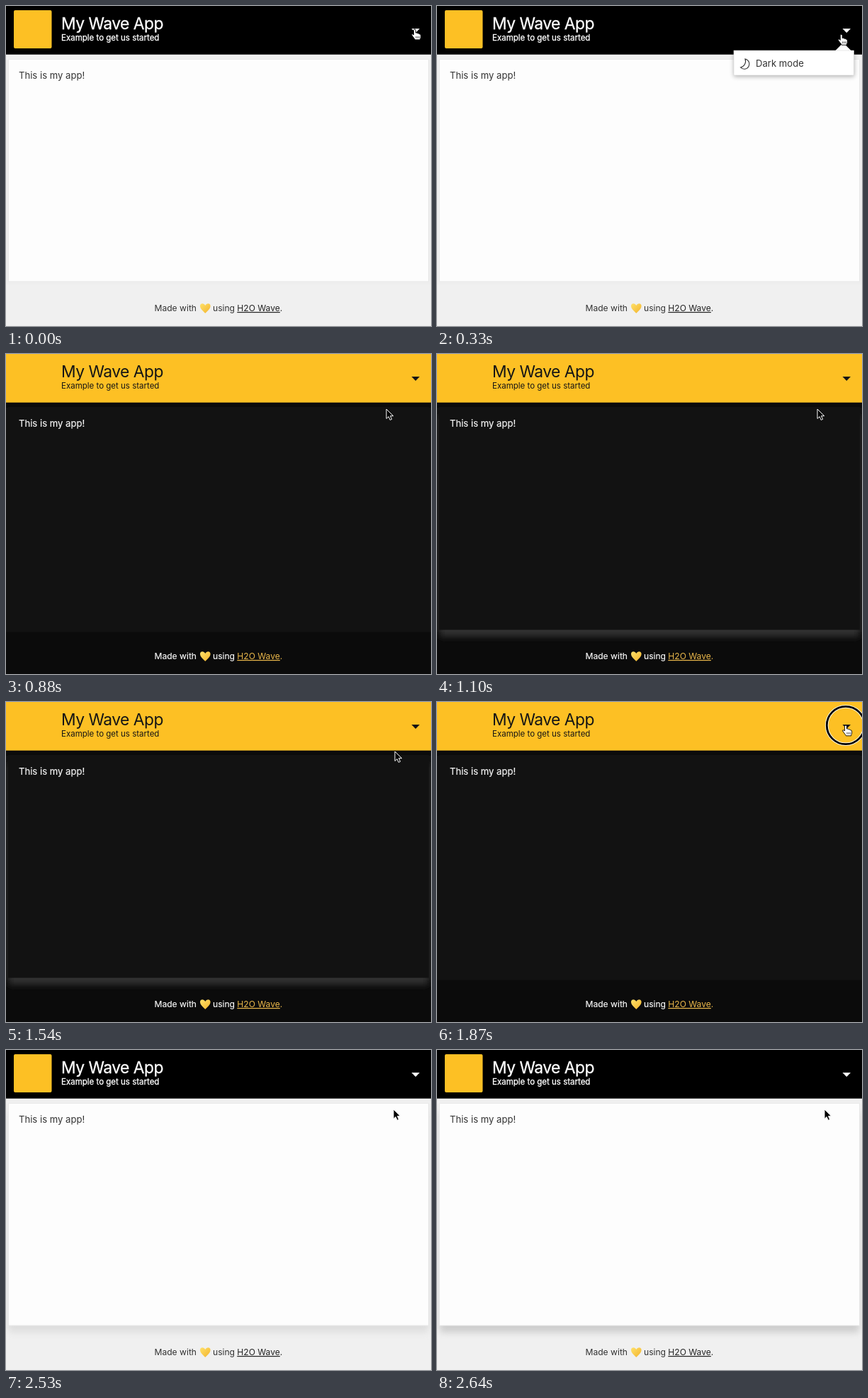
Recreate the animation shown at these times as an HTML page. Size 600x453 px, loop 2.75 s.

```html
<!DOCTYPE html>
<html lang="en">
<head>
<meta charset="utf-8">
<title>Theme switch</title>
<style>
html, body { margin: 0; width: 100%; height: 100%; overflow: hidden; }
svg {
  display: block; width: 100vw; height: 100vh;
  font-family: Inter, "Liberation Sans", sans-serif;
  --page: #f0f0f0; --rest: #eee; --card: #fdfdfd; --edge: #e9e9e9; --shade: #cecece;
  --bar: #000; --title: #fff; --text: #333; --link: #222;
  --menu: #fff; --hover: #ececec; --rim: #d6d6d6;
}
svg.dark {
  --page: #0b0b0b; --rest: #121212; --card: #121212; --edge: #121212; --shade: #323232;
  --bar: #fdc024; --title: #151515; --text: #f4f4f4; --link: #ecb94b;
  --menu: #141414; --hover: #2e2e2e; --rim: #242424;
}
.bar { fill: var(--bar); }
.title { fill: var(--title); }
.text { fill: var(--text); }
.link { fill: var(--link); }
svg:not(.dark) .head { stroke: #fff; stroke-width: .3px; }
.dark .text { stroke: var(--text); stroke-width: .2px; }
.night, .dark .day { display: none; }
.dark .night { display: inline; }
.icon { fill: none; stroke: var(--text); stroke-width: 1.1; }
.sun { stroke: #fdc024; }
</style>
</head>
<body>
<svg id="app" viewBox="0 0 600 453" preserveAspectRatio="none">
  <defs>
    <filter id="blur" x="-10%" y="-10%" width="120%" height="120%"><feGaussianBlur stdDeviation="5"/></filter>
    <filter id="soft" x="-10%" y="-40%" width="120%" height="180%"><feGaussianBlur stdDeviation="3"/></filter>
    <linearGradient id="gold" x2="1" y2="1"><stop stop-color="#ffe16a"/><stop offset="1" stop-color="#f2b32c"/></linearGradient>
  </defs>

  <rect width="600" height="453" fill="var(--page)"/>
  <rect y="76" width="600" height="317.5" fill="var(--rest)"/>
  <rect id="shade" x="4" y="88" width="592" height="312" fill="var(--shade)" filter="url(#blur)"/>
  <rect x="3.5" y="75.5" width="593" height="314.5" fill="var(--card)" stroke="var(--edge)"/>
  <text class="text" x="18" y="103" font-size="13.1">This is my app!</text>

  <rect class="bar" width="600" height="68.7"/>
  <rect x="11" y="6" width="53.5" height="54" rx="2" fill="#fdc024"/>
  <g class="title head">
    <text x="78" y="33" font-size="22.8" letter-spacing="-.5">My Wave App</text>
    <text x="78" y="49" font-size="11.5">Example to get us started</text>
  </g>
  <path class="title" d="M572.5 32h11.5l-5.75 6z"/>

  <g font-size="12.1">
    <text class="text" x="209.5" y="432">Made with</text>
    <path d="M281.3 435C278 431.5 274 429 274 424.6C274 420.6 279.3 420 281.3 424C283.3 420 288.6 420.6 288.6 424.6C288.6 429 284.6 431.5 281.3 435Z" fill="url(#gold)"/>
    <text class="text" x="292" y="432">using</text>
    <text class="link" x="326.3" y="432"><tspan text-decoration="underline">H2O Wave</tspan>.</text>
  </g>

  <g id="menu">
    <rect x="419" y="66" width="170" height="34" opacity=".3" filter="url(#soft)"/>
    <path d="M562 63.5l11.5-11.5 11.5 11.5z" fill="var(--menu)"/>
    <rect id="item" x="419" y="63" width="169.5" height="35" stroke="var(--rim)" stroke-width=".6"/>
    <g class="day">
      <path class="icon" d="M435 75A7.2 7.2 0 1 1 428.5 87A9 9 0 0 0 435 75Z"/>
      <text class="text" x="450" y="86" font-size="13.1">Dark mode</text>
    </g>
    <g class="night">
      <g class="icon sun" transform="translate(434.5 82)">
        <circle r="3.4"/>
        <path d="M0-5v-2.5M0 5v2.5M-5 0h-2.5M5 0h2.5M3.6-3.6l1.7-1.7M-3.6-3.6l-1.7-1.7M3.6 3.6l1.7 1.7M-3.6 3.6l-1.7 1.7"/>
      </g>
      <text class="text" x="450" y="86" font-size="13.1">Light mode</text>
    </g>
  </g>

  <g id="cursor">
    <g id="ring" fill="none">
      <circle r="26.7" stroke="#fff" stroke-width="4.8" opacity=".85"/>
      <circle r="26.7" stroke="#000" stroke-width="2.8"/>
    </g>
    <g id="hand" fill="#fff" stroke="#000" stroke-linejoin="round" transform="scale(.9)">
      <path d="M-1.6 1.5a1.6 1.6 0 0 1 3.2 0V5.5q2.6-.6 3 1q2.4-.4 2.8 1q2.2 0 2.2 2V12q0 1.6-1 3v1.5H.5l-.6-1.2q-2.6-3.4-4.6-6.3q-.6-1.6 1-1.6q1 0 2.1 1.5Z"/>
      <path d="M2.2 11v3M4.6 11v3M7 11v3" stroke-width=".8"/>
    </g>
    <path id="arrow" d="M0 0V13.5L3.1 10.6 5.2 15.4 7.6 14.4 5.5 9.7H9.8Z" stroke="#fff"/>
  </g>
</svg>
<script>
const LOOP = 2750, STEP = 110;
const el = id => document.getElementById(id);
const [app, shade, menu, item, cursor, ring, hand, arrow] =
  ["app", "shade", "menu", "item", "cursor", "ring", "hand", "arrow"].map(el);

// Pointer tip: time, x, y
const path = [
  [0, 577, 33], [220, 577, 33], [660, 537, 80], [770, 537, 80], [880, 537, 78],
  [1210, 537, 78], [1540, 549, 70], [1760, 577, 33], [1980, 577, 33],
  [2420, 548, 86], [2530, 547, 84], [LOOP, 547, 84]
];
// Click time: ring scale
const clicks = { 110: .92, 1870: 1, 2420: 1 };

const clamp = v => Math.max(0, Math.min(1, v));
const within = (t, a, b) => t >= a && t < b;
const show = (node, on) => node.style.display = on ? "" : "none";

function tip(t) {
  const i = path.findIndex(k => k[0] > t);
  const [t0, x0, y0] = path[i - 1], [t1, x1, y1] = path[i];
  const p = (t - t0) / (t1 - t0), e = p * p * (3 - 2 * p);
  return [x0 + (x1 - x0) * e, y0 + (y1 - y0) * e];
}

// Card shadow while the pointer rests on the card
function lift(t) {
  if (t >= 2530) return clamp((t - 2420) / 220);
  return clamp((t - 880) / 220) * clamp((1760 - t) / 220);
}

function draw(now) {
  const t = Math.floor(now % LOOP / STEP) * STEP;
  const [x, y] = tip(t);
  const pointing = !within(t, 880, 1760) && t < 2530;
  app.classList.toggle("dark", within(t, 880, 2530));
  shade.style.opacity = lift(t);
  show(menu, within(t, 220, 880) || within(t, 1980, 2530));
  item.style.fill = y > 62 ? "var(--hover)" : "var(--menu)";
  cursor.setAttribute("transform", `translate(${x} ${y})`);
  show(ring, t in clicks);
  ring.setAttribute("transform", `scale(${clicks[t] || 1})`);
  show(hand, pointing);
  show(arrow, !pointing);
}

const start = performance.now();
function tick() {
  draw(performance.now() - start);
  requestAnimationFrame(tick);
}
tick();
</script>
</body>
</html>
```
